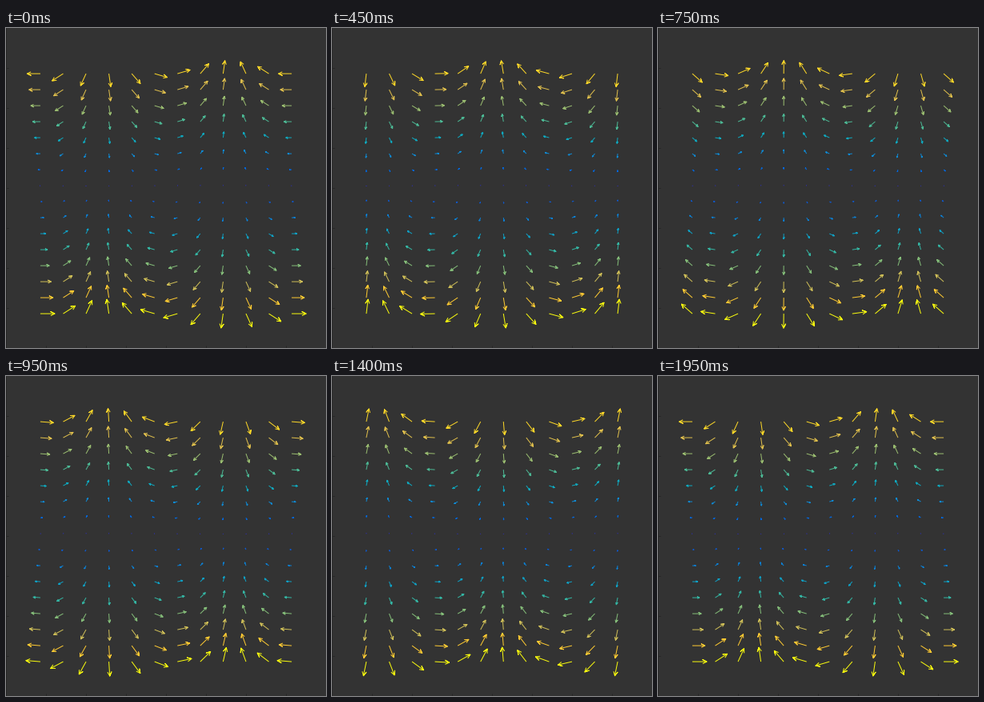
These frames come from a looping animation (400 px wide and 400 px high, 2 s). A matplotlib script:

```python
import numpy as np
import matplotlib.pyplot as plt
from matplotlib.animation import FuncAnimation
from matplotlib.collections import LineCollection
from matplotlib.colors import LinearSegmentedColormap

SIZE, DPI = 400, 100
FRAMES, INTERVAL = 40, 50
PX = 72 / DPI            # one pixel in points
SCALE = 0.36 / np.pi     # arrow length per unit of speed
HEAD, BARB = 0.28, 0.14  # head length and half width, relative to the arrow
TICK = 0.06

cmap = LinearSegmentedColormap.from_list("speed", [
    "#352a87", "#0268e1", "#108ed2", "#0faeb9",
    "#65be86", "#c0bc60", "#ffc337", "#f9fb0e"])

X, Y = (g.ravel() for g in np.meshgrid(np.linspace(-np.pi, np.pi, 12),
                                       np.arange(-np.pi, np.pi, 0.4)))
tails = np.column_stack([X, Y])


def arrows(phase):
    """Open-headed arrows of the field y * (cos(x + t), sin(x + t))."""
    angle = X + phase
    vec = SCALE * Y[:, None] * np.column_stack([np.cos(angle), np.sin(angle)])
    side = np.column_stack([-vec[:, 1], vec[:, 0]])
    tips = tails + vec
    neck = tips - HEAD * vec
    return np.stack(
        [tails, tips, neck + BARB * side, tips, neck - BARB * side], axis=1)


fig = plt.figure(figsize=(SIZE / DPI, SIZE / DPI), dpi=DPI, facecolor="#333333")
ax = fig.add_axes([0, 0, 1, 1])
ax.set_xlim(-4, 4)
ax.set_ylim(-4, 4)
ax.axis("off")

# Faint axes along the left and bottom edges
edge = [[(-4, -4), (-4, 4)], [(-4, -4), (4, -4)]]
for t in range(-3, 4):
    edge += [[(-4, t), (-4 + TICK, t)], [(t, -4), (t, -4 + TICK)]]
ax.add_collection(LineCollection(edge, colors="#262626", linewidths=PX))

field = LineCollection(arrows(0), colors=cmap(np.abs(Y) / np.pi),
                       linewidths=PX, joinstyle="round")
ax.add_collection(field)


def update(i):
    field.set_segments(arrows(2 * np.pi * i / (FRAMES - 1)))
    return (field,)


anim = FuncAnimation(fig, update, frames=FRAMES, interval=INTERVAL,
                     repeat=True, repeat_delay=0)
plt.show()
```
